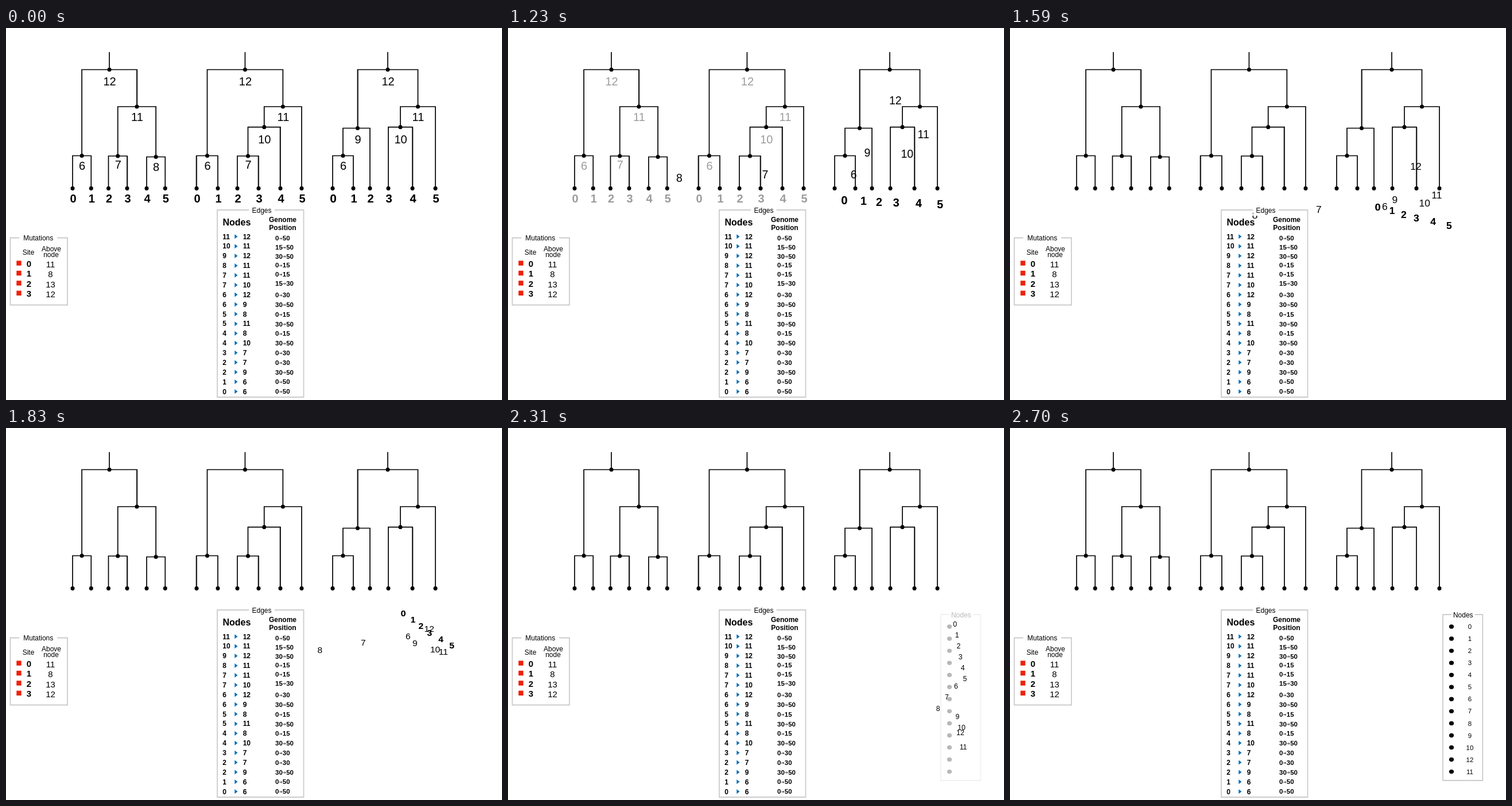
Recreate the animation shown at these times as an HTML page with a canvas. Size 864x648 px, loop 3.63 s.

```html
<!DOCTYPE html>
<html lang="en">
<head>
<meta charset="utf-8">
<title>Tree sequence tables</title>
<style>
html, body { margin: 0; width: 100%; height: 100%; overflow: hidden; background: #fff; }
canvas { display: block; }
</style>
</head>
<body>
<canvas id="stage" width="864" height="648"></canvas>
<script>
const ctx = document.getElementById('stage').getContext('2d');
const LOOP = 3630, STEP = 30, START = 900, END = 2700, FADE = 540;
const LEAF_Y = 279.3, LEAF_LABEL_Y = 296.3;

// Height of each inner node and of its label
const levels = {
  6: [222.5, 239.5], 7: [223, 238], 8: [224.5, 242], 9: [174.5, 194],
  10: [172.7, 194], 11: [137, 155], 12: [72.5, 93]
};

// Joins read parent:left,right; "~" marks a branch with a grey edge on the given side
const trees = [
  { leaves: [116, 148.3, 178.5, 211, 245, 277.3], side: 1,
    joins: '6:0,1 7:2,3~ 8:4,5 11:7,8 12:6,11~' },
  { leaves: [332, 369, 403, 440, 478, 515], side: -1,
    joins: '6:0~,1 7:2,3~ 10:7,4~ 11:10,5 12:6,11' },
  { leaves: [569, 605, 634, 666, 708, 748], side: 1, nudge: { 9: 2 },
    joins: '6:0,1 9:6,2 10:3,4~ 11:10,5 12:9~,11' }
].map(buildTree);

const edges = `11 12 0 50, 10 11 15 50, 9 12 30 50, 8 11 0 15, 7 11 0 15, 7 10 15 30,
  6 12 0 30, 6 9 30 50, 5 8 0 15, 5 11 30 50, 4 8 0 15, 4 10 30 50, 3 7 0 30,
  2 7 0 30, 2 9 30 50, 1 6 0 50, 0 6 0 50`.split(',').map(row => row.trim().split(' '));
const mutations = [11, 8, 13, 12];

// The last tree that holds a label sends it to the table; the other copies fade
const rows = [0, 1, 2, 3, 4, 5, 6, 7, 8, 9, 10, 12, 11];
const movers = rows.map(n => trees.findLast(tree => tree.nodes[n]).nodes[n]);
const fading = trees.flatMap(tree => Object.values(tree.nodes)).filter(n => !movers.includes(n));

const rowY = i => 346 + 21.05 * i;
const clamp = v => Math.min(1, Math.max(0, v));
const mix = (a, b, p) => a + (b - a) * p;

// Every inner node sits midway between its two children
function buildTree({ leaves, joins, side, nudge = {} }) {
  const nodes = {};
  leaves.forEach((x, name) => {
    nodes[name] = { name, x, y: LEAF_Y, labelX: x + 1, labelY: LEAF_LABEL_Y, bold: true };
  });
  const forks = joins.split(' ').map(join => {
    const [name, arms] = join.split(':');
    const children = arms.split(',').map(arm => ({
      node: nodes[parseInt(arm)], shadow: arm.endsWith('~')
    }));
    const x = (children[0].node.x + children[1].node.x) / 2 + (nudge[name] || 0);
    const [y, labelY] = levels[name];
    nodes[name] = { name, x, y, labelX: x + 0.5, labelY };
    return { y, children };
  });
  return { nodes, forks, side };
}

// cubic-bezier(.42, 0, .58, 1)
function ease(u) {
  let lo = 0, hi = 1;
  for (let i = 0; i < 24; i++) {
    const s = (lo + hi) / 2, r = 1 - s;
    if (1.26 * s * r * r + 1.74 * s * s * r + s * s * s < u) lo = s; else hi = s;
  }
  return lo * lo * (3 - 2 * lo);
}

function text(str, x, y, size, { bold = false, align = 'center' } = {}) {
  ctx.font = `${bold ? 'bold ' : ''}${size}px "Liberation Sans", Arial, sans-serif`;
  ctx.textAlign = align;
  ctx.fillText(str, x, y + size * 0.36);
}

function dot(x, y, rx = 3.5, ry = 3.6) {
  ctx.beginPath();
  ctx.ellipse(x, y, rx, ry, 0, 0, 2 * Math.PI);
  ctx.fill();
}

function polyline(points, color = '#000', width = 1.7) {
  ctx.strokeStyle = color;
  ctx.lineWidth = width;
  ctx.beginPath();
  points.forEach(([x, y]) => ctx.lineTo(x, y));
  ctx.stroke();
}

function panel(title, x1, y1, x2, y2, gap1, gap2) {
  polyline([[gap1, y1], [x1, y1], [x1, y2], [x2, y2], [x2, y1], [gap2, y1]], '#ccc', 1.8);
  ctx.fillStyle = '#fff';
  ctx.fillRect(gap1, y1 - 7, gap2 - gap1, 17);
  ctx.fillStyle = '#000';
  text(title, (gap1 + gap2) / 2, y1 + 0.5, 12);
}

function drawTree({ nodes, forks, side }, t) {
  for (const { y, children } of forks) {
    for (const { node, shadow } of children) {
      const x = node.x + side;
      if (shadow && t < END) polyline([[x, y], [x, node.y]], '#999', 1.4);
    }
    const [a, b] = children.map(child => child.node);
    polyline([[a.x, a.y], [a.x, y], [b.x, y], [b.x, b.y]]);
  }
  const root = nodes[12];
  polyline([[root.x, 42], [root.x, root.y]]);
  Object.values(nodes).forEach(n => dot(n.x, n.y));
}

function drawFading(t) {
  ctx.globalAlpha = clamp(1 - (t - START) / FADE);
  fading.forEach(n => text(n.name, n.labelX, n.labelY, 20, n));
  ctx.globalAlpha = 1;
}

function drawMovers(t, p) {
  const boldness = clamp((2200 - t) / 300);
  movers.forEach((n, i) => {
    const place = [n.name, mix(n.labelX, 801, p), mix(n.labelY, rowY(i), p), mix(20, 11.5, p)];
    text(...place);
    if (n.bold) {
      ctx.globalAlpha = boldness;
      text(...place, n);
      ctx.globalAlpha = 1;
    }
  });
}

function drawEdges() {
  const left = { bold: true, align: 'left' };
  panel('Edges', 368, 317, 518.5, 643, 423.5, 467.5);
  text('Nodes', 377.5, 338, 16, left);
  text('Genome', 482, 334, 12, { bold: true });
  text('Position', 482, 347.5, 12, { bold: true });
  edges.forEach(([child, parent, from, to], i) => {
    const y = 363.3 + 16.87 * i;
    text(child, 377.3, y, 12, left);
    text(parent, 412.7, y, 12, left);
    ctx.fillStyle = '#0a72b5';
    ctx.beginPath();
    ctx.moveTo(398.3, y - 4);
    ctx.lineTo(403.5, y);
    ctx.lineTo(398.3, y + 4);
    ctx.fill();
    ctx.fillStyle = '#000';

    // The intervals are set in two blocks with their own spacing
    const spanY = i < 6 ? 366 + 15.7 * i : 465 + 16.8 * (i - 6);
    text(from, 469, spanY, 11.5, left);
    const x = 469 + ctx.measureText(from).width, mid = spanY + 0.8;
    text(to, x + 6.4, spanY, 11.5, left);
    polyline([[x + 0.5, mid], [x + 5, mid]], '#000', 0.8);
    polyline([[x + 3.6, mid - 1.6], [x + 5.4, mid], [x + 3.6, mid + 1.6]], '#000', 0.8);
  });
}

function drawMutations() {
  panel('Mutations', 7.5, 365.5, 107, 482.5, 23.5, 89);
  text('Site', 39, 391, 12);
  text('Above', 79, 385, 12);
  text('node', 78.5, 394.5, 12);
  mutations.forEach((node, i) => {
    const y = 411 + 17.4 * i;
    ctx.fillStyle = '#ee220c';
    ctx.fillRect(18.3, y - 5.6, 8.4, 8.4);
    ctx.fillStyle = '#000';
    text(i, 40, y - 0.4, 15, { bold: true });
    text(node, 77.5, y + 0.3, 15);
  });
}

function drawNodeTable(t) {
  ctx.globalAlpha = clamp((t - END + FADE) / FADE);
  panel('Nodes', 754, 325, 823.3, 614, 769, 809.5);
  rows.forEach((_, i) => dot(769, rowY(i), 4.1, 3.7));
  ctx.globalAlpha = 1;
}

function frame(now) {
  const t = Math.floor((now % LOOP) / STEP) * STEP;
  const p = ease(clamp((t - START) / (END - START)));
  ctx.fillStyle = '#fff';
  ctx.fillRect(0, 0, 864, 648);
  ctx.fillStyle = '#000';
  trees.forEach(tree => drawTree(tree, t));
  drawFading(t);
  drawNodeTable(t);
  drawMovers(t, p);
  drawEdges();
  drawMutations();
  requestAnimationFrame(frame);
}
frame(performance.now());
</script>
</body>
</html>
```
